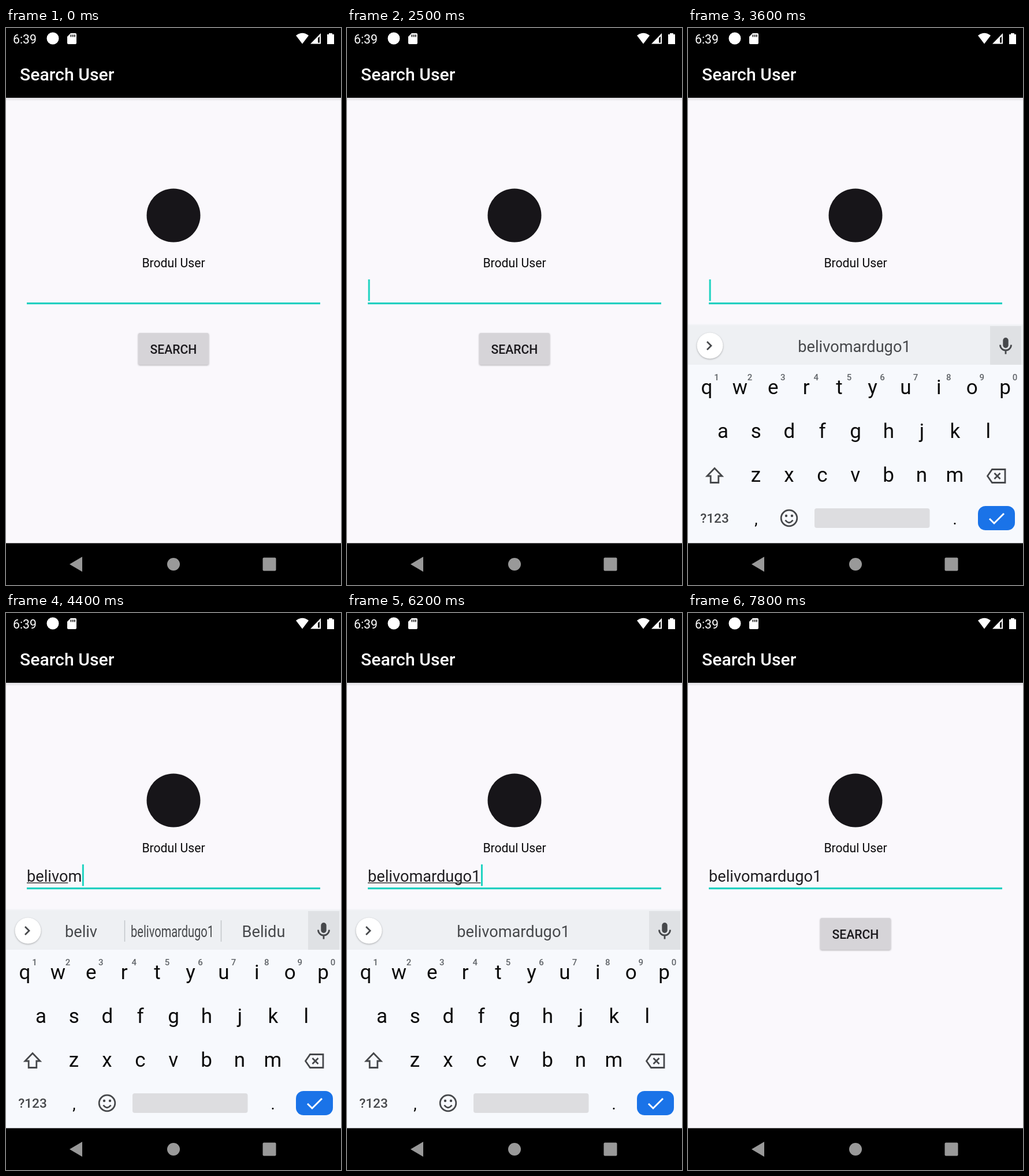
Recreate the animation shown at these times as an HTML page. Size 580 px wide and 966 px high, loop 8 s.

```html
<!DOCTYPE html>
<html lang="en">
<head>
<meta charset="utf-8">
<title>Search User</title>
<style>
  html, body { margin: 0; width: 100%; height: 100%; overflow: hidden; background: #000; }
  svg { display: block; font-family: Roboto, sans-serif; }
  .mid { text-anchor: middle; }
  .medium { font-weight: 500; }
  .line { fill: none; stroke: #46484b; stroke-width: 2.8; }
  .soft { filter: drop-shadow(0 1px 1.5px rgba(0, 0, 0, .3)); }
</style>
</head>
<body>
<svg width="580" height="966" viewBox="0 0 580 966">
  <linearGradient id="barShadow" x2="0" y2="1">
    <stop stop-color="#dddce0"/><stop offset="1" stop-color="#faf8fc"/>
  </linearGradient>
  <rect width="580" height="966"/>
  <rect y="121" width="580" height="772.5" fill="#faf8fc"/>
  <rect y="121" width="580" height="6" fill="url(#barShadow)"/>

  <g fill="#fff">
    <text x="12" y="26.5" font-size="21.2">6:39</text>
    <circle cx="81" cy="18" r="10.5"/>
    <path d="M112 9H120Q122 9 122 11V26Q122 28 120 28H108Q106 28 106 26V15Z"/>
    <path d="M502 13Q513 4.5 524 13L513 27.5Z"/>
    <path d="M527 27.5L545 9V27.5ZM540 17.5V25.5H543V14.5Z" fill-rule="evenodd"/>
    <path d="M559 9H565V11H568V28H556V11H559Z"/>
    <text x="24" y="91" font-size="30.2" class="medium">Search User</text>
  </g>
  <path d="M112.5 11.5v4M115.8 11.5v4M119 11.5v4" stroke="#000" stroke-width="1.6"/>

  <circle cx="290" cy="325" r="46.5" fill="#171519"/>
  <text x="290" y="415" font-size="21.15" class="mid" fill="#0c0b0d">Brodul User</text>
  <rect x="36" y="476" width="508" height="3.2" fill="#20cfc0"/>
  <text id="entry" x="36" y="466" font-size="27.2" fill="#1f1d21"></text>
  <rect id="composing" x="36" y="467.3" height="1.5" fill="#333"/>
  <rect id="cursor" y="436" width="3" height="37.5" fill="#1dd3c0"/>
  <rect x="229" y="529" width="122" height="55" rx="3" fill="#d6d4d8" class="soft"/>
  <text x="290" y="565" font-size="21.15" class="mid medium" fill="#1a181c">SEARCH</text>

  <g id="keyboard">
    <rect y="513.5" width="580" height="3" fill="#f4f4f7"/>
    <rect y="515.5" width="580" height="69" fill="#eef0f3"/>
    <rect y="584" width="580" height="310" fill="#f7f9fd"/>
    <rect y="893.5" width="580" height="80"/>
    <rect id="micBox" x="523" y="517" width="54" height="67" fill="#dfe1e4"/>
    <circle cx="38" cy="551" r="22.5" fill="#fff" class="soft"/>
    <path class="line" d="M33 544l7 7l-7 7"/>
    <rect x="545.3" y="537" width="9.4" height="18" rx="4.7" fill="#46484b"/>
    <path class="line" d="M540.5 549.5a9.5 9.5 0 0 0 19 0M550 559v6.5"/>
    <path id="dividers" d="M205.5 533V570M372.5 533V570" stroke="#c3c5c9" stroke-width="1.5"/>
    <g id="suggestions" class="mid" font-size="27.2" fill="#46484b"><text/><text/><text/></g>
    <g id="keys" class="mid" font-size="35" fill="#0b0b0b"></g>

    <path class="line" d="M46 763.5L59 777H52.8V788.5H39.2V777H33Z"/>
    <path class="line" d="M518.5 777L526.5 765.5H549V788.5H526.5ZM530.5 772l10 10M540.5 772l-10 10"/>
    <text x="46" y="858" font-size="22.7" class="mid medium" fill="#46484b">?123</text>
    <text x="118" y="861" font-size="27" class="mid">,</text>
    <text x="462" y="861" font-size="27" class="mid">.</text>
    <circle class="line" cx="175" cy="850" r="13.8"/>
    <path class="line" d="M168.5 853.5Q175 862 181.5 853.5"/>
    <g fill="#46484b"><circle cx="170" cy="846" r="2.2"/><circle cx="180" cy="846" r="2.2"/></g>
    <rect x="219" y="833" width="199.5" height="34" rx="4" fill="#dddde0"/>
    <rect x="502" y="829" width="64" height="42" rx="13" fill="#1a73e8"/>
    <path d="M522 851l8 8l17-17" fill="none" stroke="#fff" stroke-width="3"/>
  </g>

  <rect y="893.5" width="580" height="73" opacity=".15"/>
  <g fill="#fff" opacity=".6">
    <path d="M110 930L132 917V943Z"/>
    <circle cx="290" cy="930" r="11"/>
    <rect x="444.5" y="918.5" width="23" height="23" rx="2"/>
  </g>
</svg>
<script>
const $ = id => document.getElementById(id);
const LOOP = 8000, STEP = 100, KEYBOARD_HEIGHT = 452;
const userName = 'belivomardugo1';
const typeTimes = [3700, 3800, 4000, 4100, 4200, 4300, 4400, 4600, 4700, 4900, 5000, 5200, 5300, 5500];
const cursorSpans = [[700, 1000], [2500, 3000], [3600, 6300], [6700, 7300]];
const slots = [{ x: 130, max: 126 }, { x: 288, max: 144 }, { x: 446, max: 126 }];

const pen = document.createElement('canvas').getContext('2d');
pen.font = '27.2px Roboto, sans-serif';
const widthOf = text => pen.measureText(text).width;
const typedAt = t => userName.slice(0, typeTimes.filter(time => time <= t).length);
const show = (id, on) => $(id).setAttribute('visibility', on ? 'inherit' : 'hidden');

const row = (letters, x, y, attrs = '') => [...letters].map((letter, i) =>
  `<text x="${x + 57.4 * i}" y="${y}" ${attrs}>${letter}</text>`).join('');
$('keys').innerHTML = row('qwertyuiop', 32.5, 635) + row('asdfghjkl', 60.5, 711) +
  row('zxcvbnm', 117.5, 787) +
  row('1234567890', 49.5, 611, 'font-size="15" class="medium" fill="#5f6368"');

function keyboardOffset(t) {
  const enter = Math.max(0, 1 - (t - 2600) / 235);
  const leave = Math.max(0, (t - 7066) / 200);
  return KEYBOARD_HEIGHT * (enter ** 3 + leave ** 2);
}

function suggestionsAt(t) {
  const seen = typedAt(t - 200);
  if (t >= 7000) return ['', '', ''];
  return !seen || seen === userName ? ['', userName, ''] : [seen, userName, 'Belidu'];
}

function draw(t) {
  const typed = typedAt(t);
  $('entry').textContent = typed;
  $('composing').setAttribute('width', t < 7000 ? widthOf(typedAt(t - 100)) : 0);
  $('cursor').setAttribute('x', 36.6 + widthOf(typed));
  show('cursor', cursorSpans.some(([from, to]) => t >= from && t < to));

  show('keyboard', t >= 2700 && t < 7300);
  $('keyboard').setAttribute('transform', `translate(0 ${keyboardOffset(t)})`);
  show('micBox', t >= 2900);

  const words = suggestionsAt(t), split = words[0] !== '';
  show('dividers', split);
  [...$('suggestions').children].forEach((node, i) => {
    // Long words are condensed to the space of their slot.
    const scale = split ? Math.min(1, slots[i].max / (widthOf(words[i]) || 1)) : 1;
    node.textContent = words[i];
    node.setAttribute('transform', `translate(${slots[i].x} 562) scale(${scale} 1)`);
  });
}

let last = -1;
function tick(now) {
  const t = Math.floor(now % LOOP / STEP) * STEP;
  if (t !== last) draw(last = t);
  requestAnimationFrame(tick);
}
draw(0);
requestAnimationFrame(tick);
</script>
</body>
</html>
```
